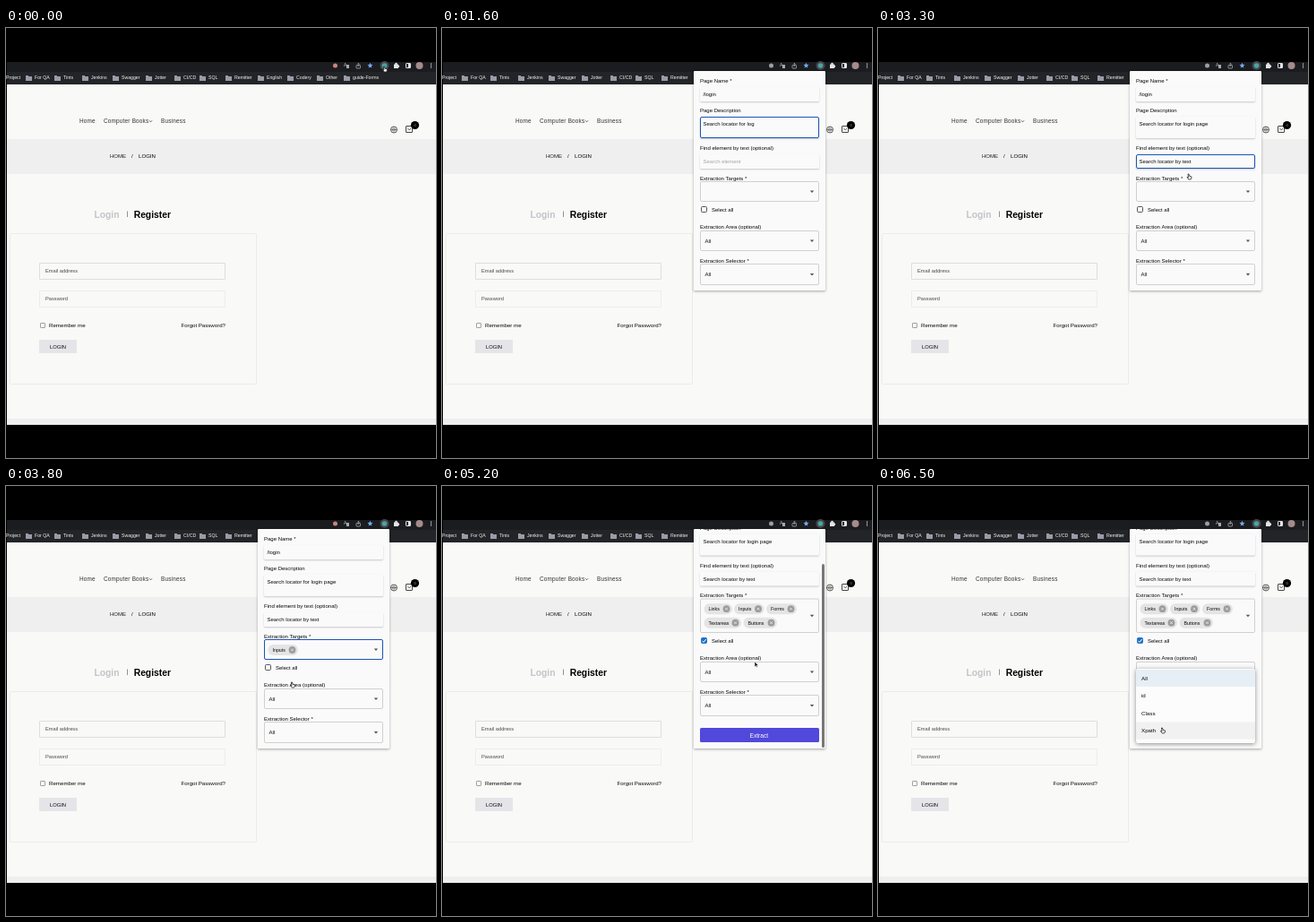
Write an HTML page with a canvas that moves like this. It is 480 px wide and 480 px high and loops after 7.5 s.

```html
<!DOCTYPE html>
<html lang="en">
<head>
<meta charset="utf-8">
<title>Locator extraction</title>
<style>
html, body { margin: 0; width: 100%; height: 100%; overflow: hidden; background: #000; }
canvas { display: block; }
</style>
</head>
<body>
<canvas id="stage" width="480" height="480"></canvas>
<script>
const g = document.getElementById('stage').getContext('2d');
const LOOP = 7500, STEP = 100;
const BLUE = '#1b55b4', INK = '#08080a';

function rect(x, y, w, h, fill) {
  g.fillStyle = fill;
  g.fillRect(x, y, w, h);
}
function round(x, y, w, h, r, fill, stroke, line = 1) {
  g.beginPath();
  g.roundRect(x, y, w, h, r);
  if (fill) { g.fillStyle = fill; g.fill(); }
  if (stroke) { g.strokeStyle = stroke; g.lineWidth = line; g.stroke(); }
}
function circle(x, y, r, fill, stroke, line = 1) {
  round(x - r, y - r, 2 * r, 2 * r, r, fill, stroke, line);
}
function path(points, stroke, line = 1, fill) {
  g.beginPath();
  points.forEach(([x, y]) => g.lineTo(x, y));
  if (fill) { g.closePath(); g.fillStyle = fill; g.fill(); }
  if (stroke) { g.strokeStyle = stroke; g.lineWidth = line; g.stroke(); }
}
// y is the middle of the capital letters
function text(s, x, y, size = 6, color = INK, weight = 400, spacing = 0) {
  g.font = `${weight} ${size}px "Liberation Sans", Arial, sans-serif`;
  g.letterSpacing = spacing + 'px';
  g.fillStyle = color;
  g.fillText(s, x, y + size * 0.35);
  return g.measureText(s).width;
}
function card(x, y, w, h, r, fill, alpha, blur) {
  g.save();
  g.shadowColor = `rgba(0,0,0,${alpha})`;
  g.shadowBlur = blur;
  g.shadowOffsetY = 1;
  round(x, y, w, h, r, fill);
  g.restore();
}

const bookmarks = [
  [22, 'For QA'], [54, 'Tints'], [85, 'Jenkins'], [119, 'Swagger'], [156, 'Jotter'],
  [188, 'CI/CD'], [216, 'SQL'], [245, 'Remitter'], [281, 'English'], [314, 'Codery'],
  [347, 'Other'], [377, 'guide-Forms']
];

function browser(t) {
  rect(0, 0, 480, 480, '#000');
  rect(1, 38, 479, 11, '#1b1c1f');
  rect(1, 49, 479, 14, '#232427');
  text('Project', 0, 55.5, 5.2, '#f4f4f6');
  for (const [x, label] of bookmarks) {
    rect(x, 53, 3, 2, '#989ca6');
    rect(x, 54, 7, 5, '#989ca6');
    text(label, x + 10, 55.5, 5.2, '#f4f4f6');
  }
  const red = t / 940 % 1 < 0.5;
  circle(367.5, 42, 2.5, red ? '#c98580' : '#9b9da1');
  text('A', 377, 41.5, 5, '#c8cacd');
  rect(380, 41, 3, 4, '#a6a8ab');
  round(391, 41.5, 4.5, 3.5, 0.5, null, '#a6a8ab', 0.8);
  path([[393.2, 43], [393.2, 39], [394.7, 40.5]], '#a6a8ab', 0.8);
  const star = Array.from({ length: 10 }, (_, i) => {
    const a = i * Math.PI / 5 - Math.PI / 2, r = i % 2 ? 1.4 : 3.2;
    return [406.5 + r * Math.cos(a), 42 + r * Math.sin(a)];
  });
  path(star, null, 0, '#77aaf2');
  circle(422.5, 42, 5, '#45474b');
  circle(422.5, 42, 2.8, '#4ba3a5');
  rect(433, 40.5, 5, 4.5, '#e4e4e6');
  circle(435.5, 40, 1.3, '#e4e4e6');
  circle(438, 42.7, 1.2, '#e4e4e6');
  round(446.5, 39.5, 5, 5, 0.6, null, '#e4e4e6');
  rect(449, 39.5, 2.5, 5, '#e4e4e6');
  circle(461.5, 42, 4, '#a58c8b');
  for (const y of [40, 42, 44]) circle(474.5, y, 0.7, '#d0d1d4');
}

function site() {
  rect(1, 63, 479, 380, '#f9f9f7');
  rect(1, 124, 479, 39, '#efeff0');
  rect(1, 436, 479, 7, '#efeff0');
  text('Home', 82, 104, 6.4, '#343437', 400, 0.2);
  text('Computer Books', 109, 104, 6.4, '#343437', 400, 0.2);
  path([[160, 103.3], [161.5, 104.8], [163, 103.3]], '#343437', 0.8);
  text('Business', 173, 104, 6.4, '#343437', 400, 0.2);
  circle(433, 113.5, 3.5, null, '#444', 0.9);
  circle(433, 113.5, 1.6, null, '#444', 0.7);
  path([[429.5, 113.5], [436.5, 113.5]], '#444', 0.6);
  round(446.5, 109.5, 7, 7, 0.5, null, '#333', 0.9);
  path([[448.5, 112], [450.2, 114], [452, 112]], '#333', 0.7);
  circle(456.5, 108.5, 4.6, '#000');
  text('0', 455.4, 108.5, 4, '#aaa');

  text('HOME', 116, 143.3, 6, '#19191b');
  text('/', 140, 143.3, 6);
  text('LOGIN', 148, 143.3, 6.1, '#000');
  text('Login', 98.5, 208.8, 10.3, '#c3c3ca', 700);
  rect(135, 204.5, 0.8, 6.5, '#777');
  text('Register', 142.7, 208.8, 10.3, '#000', 700);

  round(4.5, 229.5, 275, 168, 1, null, '#ebebe7');
  round(37.5, 262.5, 207, 18, 0, null, '#dededa');
  text('Email address', 44, 271.5, 5.7, '#48484b');
  round(37.5, 293.5, 207, 18, 0, null, '#ededea');
  text('Password', 44, 302, 5.7, '#48484b');
  round(38.5, 329.5, 5, 5, 0.6, '#fff', '#777', 0.7);
  text('Remember me', 48, 332.3, 6.15);
  text('Forgot Password?', 195.5, 332.3, 6.1);
  rect(37, 348, 42, 15, '#e5e5e9');
  text('LOGIN', 49, 355.7, 5.8);
}

function field(y, h, focus) {
  card(288, y, 133, h, 1.5, '#fafafa', 0.2, 2);
  if (focus) round(288.5, y + 0.5, 132, h - 1, 1.5, null, BLUE);
}
function input(value, y, focus, t, hint = '') {
  const w = text(value || hint, 291.5, y, 6, value ? INK : '#a4a4a6');
  if (focus && Math.floor(t / 300) % 2 === 0) rect(292 + (value ? w : 0), y - 3.5, 0.8, 7, '#000');
}
function select(y, h, value, focus) {
  const mid = y + h / 2;
  round(288.5, y + 0.5, 132, h - 1, 1.5, '#fafafa', focus ? BLUE : '#d0d0d0');
  text(value, 293.5, mid, 6);
  path([[410.8, mid - 1], [415.2, mid - 1], [413, mid + 1.4]], null, 0, '#555');
}
function chip(label, x, y, w) {
  round(x, y - 6, w, 12, 6, '#e4e4e4');
  text(label, x + 5, y, 5.3);
  const cx = x + w - 6.5;
  circle(cx, y, 3.9, '#9c9c9e');
  path([[cx - 1.4, y - 1.4], [cx + 1.4, y + 1.4]], '#eee', 0.8);
  path([[cx + 1.4, y - 1.4], [cx - 1.4, y + 1.4]], '#eee', 0.8);
}

const ROW = 19.5;
function menu(items, top, mouseY, selected) {
  const hover = Math.floor((mouseY - top - 1) / ROW);
  card(288, top, 133, items.length * ROW + 5, 2, '#fcfcfc', 0.45, 5);
  items.forEach((label, i) => {
    const y = top + 1 + i * ROW;
    if (i === selected) rect(288, y, 133, ROW - 0.5, '#e7eff6');
    else if (i === hover) rect(288, y, 133, ROW - 0.5, '#f1f1f1');
    text(label, 294, y + 9.5, 6.2);
  });
}

const typed = (s, t, start) => s.slice(0, Math.max(0, Math.floor((t - start) / 40)));
const between = (t, a, b) => t >= a && t < b;

function popup(t, mouseY) {
  const all = t >= 4400, grow = all ? 15.5 : 0;
  const u = Math.min(1, Math.max(0, (t - 4600) / 400));
  const scroll = 45.5 * u * u * (3 - 2 * u);
  const name = typed('/login', t, 400);
  const desc = typed('Search locator for login page', t, 720);
  const find = typed('Search locator by text', t, 2360);
  const onName = between(t, 400, 700), onDesc = between(t, 700, 2300), onFind = between(t, 2300, 3400);
  const areaOpen = between(t, 5500, 6100), selectorOpen = t >= 6300;

  card(281, 48, 147, 245, 1, '#fafafa', 0.35, 3);

  g.save();
  g.beginPath();
  g.rect(281, 48, 147, 245);
  g.clip();
  g.translate(0, -scroll);
  text('Page Name *', 288, 59);
  field(66, 16, onName);
  input(name, 74, onName, t);
  text('Page Description', 288, 92.3);
  field(99, 24, onDesc);
  input(desc, 107.3, onDesc, t);
  text('Find element by text (optional)', 288, 134, 6.1);
  field(141, 16, onFind);
  input(find, 149, onFind, t, 'Search element');

  text('Extraction Targets *', 288, 167.5, 6.05);
  select(171, 23 + grow, '', between(t, 3400, 4400));
  if (all) {
    chip('Links', 292.5, 182.7, 31.5);
    chip('Inputs', 326, 182.7, 33.5);
    chip('Forms', 362, 182.7, 34);
    chip('Textareas', 292.5, 198.2, 41.5);
    chip('Buttons', 336.5, 198.2, 37.5);
  } else if (t >= 3800) chip('Inputs', 292.5, 183, 33.5);

  g.translate(0, grow);
  round(289.5, 199.5, 6, 6, 1, all ? '#1f6fc4' : '#fff', all ? '#1f6fc4' : '#444', 0.9);
  if (all) path([[290.5, 202.8], [292, 204.4], [294.7, 201]], '#fff', 1);
  text('Select all', 301, 203);
  text('Extraction Area (optional)', 288, 222.2, 6.05);
  select(226, 23, t >= 6100 ? 'Main' : 'All', areaOpen);
  text('Extraction Selector *', 288, 259.5, 6.05);
  select(263, 24, 'All', selectorOpen);
  round(288, 300, 133, 16, 1.5, '#5148dc');
  text('Extract', 343.5, 308.2, 6.6, '#fff');
  g.restore();

  if (between(t, 4600, 5400)) round(424, 48 + 39 * scroll / 45.5, 3, 205, 1.5, '#777');
  if (between(t, 3400, 3800)) menu(['Links', 'Inputs', 'Forms', 'Textareas', 'Buttons'], 194, mouseY);
  if (areaOpen) menu(['All', 'Header', 'Main', 'Footer'], 204, mouseY, 0);
  if (selectorOpen) menu(['All', 'id', 'Class', 'Xpath'], 204, mouseY, 0);
}

// time, x, y
const route = [
  [0, 423, 46], [200, 423, 46], [400, 345, 74], [700, 340, 108], [1900, 340, 108],
  [2300, 335, 149], [3200, 335, 149], [3400, 360, 183], [3700, 320, 222], [3900, 320, 222],
  [4300, 293, 203], [4700, 350, 199], [5200, 350, 199], [5400, 350, 208], [5900, 329, 251],
  [6000, 329, 251], [6200, 345, 245], [6500, 318, 273], [LOOP, 318, 273]
];
const clicks = [200, 400, 2300, 3400, 3700, 4300, 5400, 6000, 6200];

function place(t) {
  const i = route.findIndex(p => p[0] > t);
  const [a, ax, ay] = route[i - 1], [b, bx, by] = route[i];
  const u = (t - a) / (b - a), e = u * u * (3 - 2 * u);
  return [ax + (bx - ax) * e, ay + (by - ay) * e];
}
function pointer(t, x, y) {
  if (between(t, 500, 1900) || between(t, 2400, 3200)) return;
  if (clicks.includes(t)) circle(x - 0.8, y - 2.7, 12.4, null, '#222', 1);
  if (between(t, 4500, 5400)) {
    path([[x - 1, y - 3], [x - 1, y + 3], [x + 0.5, y + 1.7], [x + 1.5, y + 3.5],
      [x + 2.3, y + 3], [x + 1.4, y + 1.3], [x + 3, y + 1.2]], '#fff', 0.5, '#111');
    return;
  }
  path([[x - 1.5, y - 3], [x - 0.5, y - 3], [x, y - 0.8], [x + 2.5, y], [x + 2.3, y + 2],
    [x + 1.5, y + 3], [x - 0.8, y + 3], [x - 2.5, y + 0.5], [x - 1, y + 0.8], [x - 1.5, y - 3]],
  '#222', 0.8, '#fff');
}

function draw() {
  const t = Math.floor(performance.now() % LOOP / STEP) * STEP;
  const [x, y] = place(t);
  browser(t);
  site();
  if (t >= 300) popup(t, y);
  pointer(t, x, y);
  requestAnimationFrame(draw);
}
draw();
</script>
</body>
</html>
```
